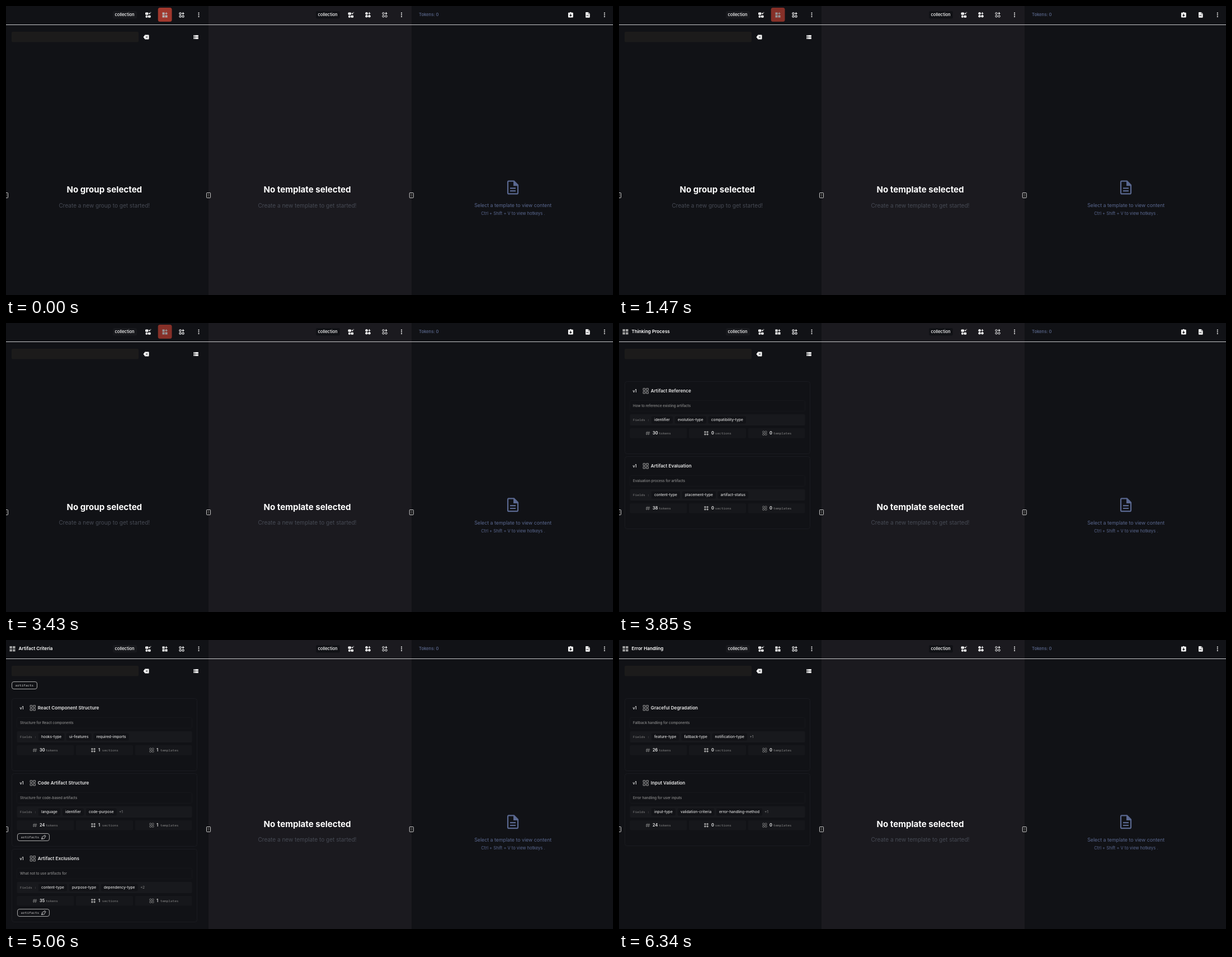
Write an HTML page that moves like this. It is 1085 px wide and 516 px high and loops after 8000 ms.

```html
<!DOCTYPE html>
<html lang="en">
<head>
<meta charset="utf-8">
<title>Template groups</title>
<style>
  html, body { margin: 0; width: 100%; height: 100%; overflow: hidden; background: #111216; }
  svg { display: block; width: 1085px; height: 516px; }
  text { font-family: Inter, sans-serif; white-space: pre; }
  .mono { font-family: "Noto Sans Mono", monospace; }
  .mid { text-anchor: middle; }
</style>
</head>
<body>
<svg id="stage" viewBox="0 0 1085 516" xmlns="http://www.w3.org/2000/svg">
  <defs>
    <g id="grid">
      <path d="M-5-4.6h4.4v4.2h-4.4zM.6-4.6h4.4v4.2h-4.4zM-5 .8h4.4v4.2h-4.4zM.6 .8h4.4v4.2h-4.4z"/>
    </g>
    <g id="gridLine" fill="none" stroke="#a3a3a3" stroke-width=".95">
      <path d="M-4.6-4.6h3.6v3.6h-3.6zM1-4.6h3.6v3.6h-3.6zM-4.6 1h3.6v3.6h-3.6zM1 1h3.6v3.6h-3.6z"/>
    </g>
    <g id="spark" fill="#fff">
      <rect x="-5" y="-4.6" width="5.4" height="4.4" rx="1.4"/>
      <rect x="-4.4" y=".8" width="3.6" height="4" rx="1.2"/>
      <rect x="0" y=".8" width="4.6" height="4" rx="1.2"/>
      <path d="M2.6-4.6l.6 1.4 1.4.6-1.4.6-.6 1.4-.6-1.4-1.4-.6 1.4-.6zM4.7-5.4l.3.8.8.3-.8.3-.3.8-.3-.8-.8-.3.8-.3z"/>
    </g>
    <g id="plus"><path d="M2.5-4.7v4.2M.4-2.6h4.2" stroke="#fff" stroke-width="1.1" fill="none"/></g>
    <g id="addSquares">
      <path d="M-4.5-4.5h4v4h-4zM-4.5.5h4v4h-4zM.5.5h4v4h-4z" fill="#fff"/><use href="#plus"/>
    </g>
    <g id="addSquaresLine">
      <path d="M-4-4h3v3h-3zM-4 1h3v3h-3zM1 1h3v3h-3z" fill="none" stroke="#fff"/><use href="#plus"/>
    </g>
    <g id="addDots" fill="#fff">
      <circle cx="-2.5" cy="-2.5" r="2.2"/><circle cx="-2.5" cy="2.5" r="2.2"/><circle cx="2.5" cy="2.5" r="2.2"/><use href="#plus"/>
    </g>
    <g id="addDotsLine" fill="none" stroke="#fff">
      <circle cx="-2.5" cy="-2.5" r="1.7"/><circle cx="-2.5" cy="2.5" r="1.7"/><circle cx="2.5" cy="2.5" r="1.7"/><use href="#plus"/>
    </g>
    <g id="fourDots">
      <circle cx="-2.1" cy="-2.1" r="1.7"/><circle cx="2.1" cy="-2.1" r="1.7"/><circle cx="-2.1" cy="2.1" r="1.7"/><circle cx="2.1" cy="2.1" r="1.7"/>
    </g>
    <g id="hash"><path d="M-1-3.4l-1.1 6.8M2.1-3.4l-1.1 6.8M-3.5-1.2h7.4M-3.9 1.3h7.4" fill="none" stroke="#8a8a8a" stroke-width=".8"/></g>
    <g id="more" fill="#fff"><circle cy="-3.2" r="1.05"/><circle r="1.05"/><circle cy="3.2" r="1.05"/></g>
    <g id="erase">
      <path d="M-5 0l3-4h6q1 0 1 1v6q0 1-1 1h-6z" fill="#fff"/>
      <path d="M-.7-1.8l3.6 3.6M2.9-1.8l-3.6 3.6" stroke="#111216" stroke-width=".9"/>
    </g>
    <g id="list"><path d="M-4.2-3.4h2v1.9h-2zM-1.6-3.4h5.8v1.9h-5.8zM-4.2-.9h2v1.9h-2zM-1.6-.9h5.8v1.9h-5.8zM-4.2 1.6h2v1.9h-2zM-1.6 1.6h5.8v1.9h-5.8z" fill="#fff"/></g>
    <g id="clip">
      <path d="M-4.4-3q0-1 1-1h2q1.4-2 2.8 0h2q1 0 1 1v6.6q0 1-1 1h-6.8q-1 0-1-1z" fill="#fff"/>
      <path d="M0-2v4M-1.9.4l1.9 1.9 1.9-1.9" fill="none" stroke="#111216" stroke-width="1.2"/>
    </g>
    <g id="file">
      <path d="M-3.8-4q0-.9.9-.9h3.9l2.8 2.8v6.1q0 .9-.9.9h-5.8q-.9 0-.9-.9z" fill="#fff"/>
      <path d="M.9-4.4v2.6h2.5M-2.2 2.4v-2l1 1 1-1v2M1-.2v2.6h.8" fill="none" stroke="#111216" stroke-width=".6"/>
    </g>
    <g id="pen" fill="none" stroke="#ddd" stroke-width=".8">
      <path d="M-3.4 3.6l1-4.2 3.6-1.8 1.9 1.9-1.8 3.3zM1.2-2.4l1-1.5 2 2-1.1 1.4M-3.4 3.6l2.8-2.8"/>
    </g>
    <g id="grip">
      <rect x="-3.3" y="-4.3" width="7" height="9" rx=".8" fill="#0a0a0c" stroke="#e4e4e4" stroke-width=".9"/>
      <path d="M-.7-2.4v5.4M1-2.4v5.4" stroke="#bbb" stroke-width=".8" stroke-dasharray=".9 .8"/>
    </g>
  </defs>
</svg>
<script>
const NS = 'http://www.w3.org/2000/svg';
const LOOP = 8000;
const stage = document.getElementById('stage');

function el(parent, tag, attrs = {}) {
  const node = document.createElementNS(NS, tag);
  for (const key in attrs) node.setAttribute(key, attrs[key]);
  return parent.appendChild(node);
}
const group = parent => el(parent, 'g');
const box = (parent, x, y, width, height, fill, rx = 0, stroke = 'none') =>
  el(parent, 'rect', { x, y, width, height, fill, rx, stroke });
const icon = (parent, id, x, y, fill = '#fff') =>
  el(parent, 'use', { href: '#' + id, transform: `translate(${x} ${y})`, fill });
function text(parent, str, x, y, size, fill = '#fff', weight = 400, cls = '') {
  const node = el(parent, 'text', { x, y, 'font-size': size, fill, 'font-weight': weight, class: cls });
  node.textContent = str;
  return node;
}

function buildFrame() {
  box(stage, 0, 0, 1085, 516, '#111216');
  box(stage, 362, 0, 363, 516, '#1b1a1f');
  box(stage, 0, 33, 1085, 1, '#c8c8ca');
  box(stage, 191, 9, 43, 13.5, '#18191d', 3);
  box(stage, 554, 9, 43, 13.5, '#111216', 3);
  text(stage, 'collection', 212, 18.2, 7.54, '#fff', 500, 'mid');
  text(stage, 'collection', 575, 18.2, 7.54, '#fff', 500, 'mid');
  text(stage, 'Tokens: 0', 738, 18.2, 7.54, '#535f80', 600);

  icon(stage, 'spark', 254, 16);
  icon(stage, 'addSquaresLine', 314, 16);
  icon(stage, 'more', 344.5, 15.8);
  icon(stage, 'spark', 616.5, 16);
  icon(stage, 'addDots', 647, 15.8);
  icon(stage, 'addDotsLine', 677, 15.8);
  icon(stage, 'more', 707, 15.8);
  icon(stage, 'clip', 1009.3, 15.8);
  icon(stage, 'file', 1039.8, 15.8);
  icon(stage, 'more', 1069.8, 15.8);

  box(stage, 10, 46, 227, 18.5, '#1c1b1b', 2);
  icon(stage, 'erase', 250.5, 55.5);
  icon(stage, 'list', 339.6, 55.4);
}

function message(parent, cx, title, hint) {
  text(parent, title, cx, 333, 15.1, '#fff', 700, 'mid');
  text(parent, hint, cx, 359.5, 10.06, '#464a54', 400, 'mid');
}

function buildPreview(parent) {
  const blue = '#5a6890';
  el(parent, 'path', {
    d: 'M898.6 312.6h9.4l7 7v13.8q0 2-2 2h-14.4q-1.6 0-1.6-2v-18.8q0-2 1.6-2zM901 325.4h10M901 330.2h10',
    fill: 'none', stroke: blue, 'stroke-width': 2.2
  });
  el(parent, 'path', { d: 'M907 312.6h1.4l7 7v1.6h-8.4z', fill: blue });
  text(parent, 'Select a template to view content', 906.2, 358.8, 8.8, blue, 400, 'mid');
  text(parent, 'Ctrl + Shift + V to view hotkeys .', 906.4, 373.2, 7.54, blue, 400, 'mid');
}

function badge(parent, x, y, width) {
  box(parent, x + .5, y + .5, width - 1, 13, 'none', 3.5, '#a8a8a8');
  text(parent, 'artifacts', x + 6.6, y + 9, 6.05, '#c9c9c9', 400, 'mono');
  if (width > 50) icon(parent, 'pen', x + 47, y + 7);
}

function tag(parent, str, x) {
  const extra = str[0] === '+';
  const back = extra ? null : box(parent, x - 5, 166.6, 0, 13, '#121317', 2);
  const label = text(parent, str, x, 175.1, 6.55, extra ? '#8d8d8d' : '#dcdcdc', extra ? 400 : 500);
  if (back) back.setAttribute('width', label.getComputedTextLength() + 10);
}

function stat(parent, i, value, unit) {
  const x = 19.5 + 105.5 * i;
  const [iconX, textX] = [[51.5, 60], [156, 165], [260.4, 269]][i];
  box(parent, x, 188, 102, 17.5, '#16171b', 2);
  const mark = icon(parent, ['hash', 'fourDots', 'fourDots'][i], iconX, 196.7, i === 1 ? '#a0a0a0' : 'none');
  if (i === 2) {
    mark.setAttribute('stroke', '#8f8f8f');
    mark.setAttribute('stroke-width', '.8');
  }
  text(parent, value, textX, 199.2, 7.4, '#f2f2f2', 600);
  text(parent, unit, textX + (i ? 6.8 : 11.2), 199.1, 6.05, '#868686', 400, 'mono');
}

function card(parent, i, [title, note, tags, tokens, uses, badged]) {
  const g = el(parent, 'g', { transform: `translate(0 ${[0, 134, 269][i]})` });
  box(g, 10.5, 104.5, 331, badged ? 130 : 129, 'none', 4, '#1a1b20');
  text(g, 'v1', 24.5, 123.7, 7, '#e8e8e8', 600);
  icon(g, 'gridLine', 47.8, 121.3);
  text(g, title, 56.8, 124.1, 8.16, '#e8e8e8', 600);
  box(g, 19.5, 138.5, 313, 19, 'none', 2, '#16171b');
  text(g, note, 25, 150.4, 6.28, '#8c8c8c', 500);
  box(g, 19.5, 163, 313, 20, '#18191d', 2);
  text(g, 'Fields :', 25, 175, 6.05, '#868686', 400, 'mono');
  tags.forEach(([str, x]) => tag(g, str, x));
  stat(g, 0, tokens, 'tokens');
  stat(g, 1, uses, 'sections');
  stat(g, 2, uses, 'templates');
  if (badged) badge(g, 20, 211, 58);
}

function buildPage({ title, top, cards }) {
  const page = group(stage);
  icon(page, 'grid', 11.5, 15.6, '#a3a3a3');
  text(page, title, 22.6, 18.4, 8.16, '#fff', 600);
  const body = group(page);
  if (top) badge(body, 10, 74, 46);
  cards.forEach((data, i) => card(body, i, data));
  return { page, body };
}

const pageData = [
  { title: 'Thinking Process', cards: [
    ['Artifact Reference', 'How to reference existing artifacts',
      [['identifier', 63], ['evolution-type', 105], ['compatibility-type', 164.7]], '30', '0'],
    ['Artifact Evaluation', 'Evaluation process for artifacts',
      [['content-type', 63], ['placement-type', 118], ['artifact-status', 181.6]], '38', '0']
  ] },
  { title: 'Artifact Criteria', top: true, cards: [
    ['React Component Structure', 'Structure for React components',
      [['hooks-type', 63], ['ui-features', 113], ['required-imports', 161.6]], '30', '1'],
    ['Code Artifact Structure', 'Structure for code-based artifacts',
      [['language', 63], ['identifier', 106], ['code-purpose', 148], ['+1', 202]], '24', '1', true],
    ['Artifact Exclusions', 'What not to use artifacts for',
      [['content-type', 63], ['purpose-type', 118], ['dependency-type', 174.7], ['+2', 240]], '35', '1', true]
  ] },
  { title: 'Error Handling', cards: [
    ['Graceful Degradation', 'Fallback handling for components',
      [['feature-type', 63], ['fallback-type', 116.5], ['notification-type', 171.6], ['+1', 233.5]], '26', '0'],
    ['Input Validation', 'Error handling for user inputs',
      [['input-type', 63], ['validation-criteria', 110], ['error-handling-method', 179], ['+1', 260]], '24', '0']
  ] }
];

buildFrame();
const button = group(stage);
const buttonBack = box(button, 271.7, 3, 24.8, 25, '#e64a38', 3.5);
icon(button, 'addSquares', 284, 16);

const shifting = group(stage);
const empty = group(shifting);
message(empty, 175.8, 'No group selected', 'Create a new group to get started!');
message(shifting, 538.5, 'No template selected', 'Create a new template to get started!');
buildPreview(shifting);

const pages = pageData.map(buildPage);
[0, 362, 724.8].forEach(x => icon(stage, 'grip', x - .2, 337.8));

// [time, value] steps, each held until the next
const pulse = [
  [0, .68], [70, .71], [210, .82], [350, .93], [490, 1],
  [980, .93], [1120, .83], [1260, .7], [1400, .59], [1470, .55],
  [1960, .62], [2030, .68], [2100, .74], [2170, .82], [2310, .97], [2520, 1],
  [2870, .93], [3010, .83], [3150, .7], [3290, .59], [3430, .55], [3710, 1]
];
const pageAt = [[0, -1], [3710, 0], [4990, 1], [6270, 2]];
const fade = [[0, 1], [3710, .4], [3780, .8], [3850, 1], [4990, .65], [5060, 1], [6270, .65], [6340, 1]];
const nudge = [[0, 0], [2030, .8]];

const at = (steps, t) => steps.reduce((value, [start, v]) => t >= start ? v : value, steps[0][1]);

function draw(t) {
  const current = at(pageAt, t);
  button.setAttribute('opacity', at(pulse, t));
  buttonBack.setAttribute('visibility', current < 0 ? 'visible' : 'hidden');
  empty.setAttribute('visibility', current < 0 ? 'visible' : 'hidden');
  shifting.setAttribute('transform', `translate(0 ${at(nudge, t)})`);
  pages.forEach(({ page, body }, i) => {
    page.setAttribute('visibility', i === current ? 'visible' : 'hidden');
    body.setAttribute('opacity', at(fade, t));
  });
}

const begin = performance.now();
function tick() {
  draw((performance.now() - begin) % LOOP);
  requestAnimationFrame(tick);
}
tick();
</script>
</body>
</html>
```
